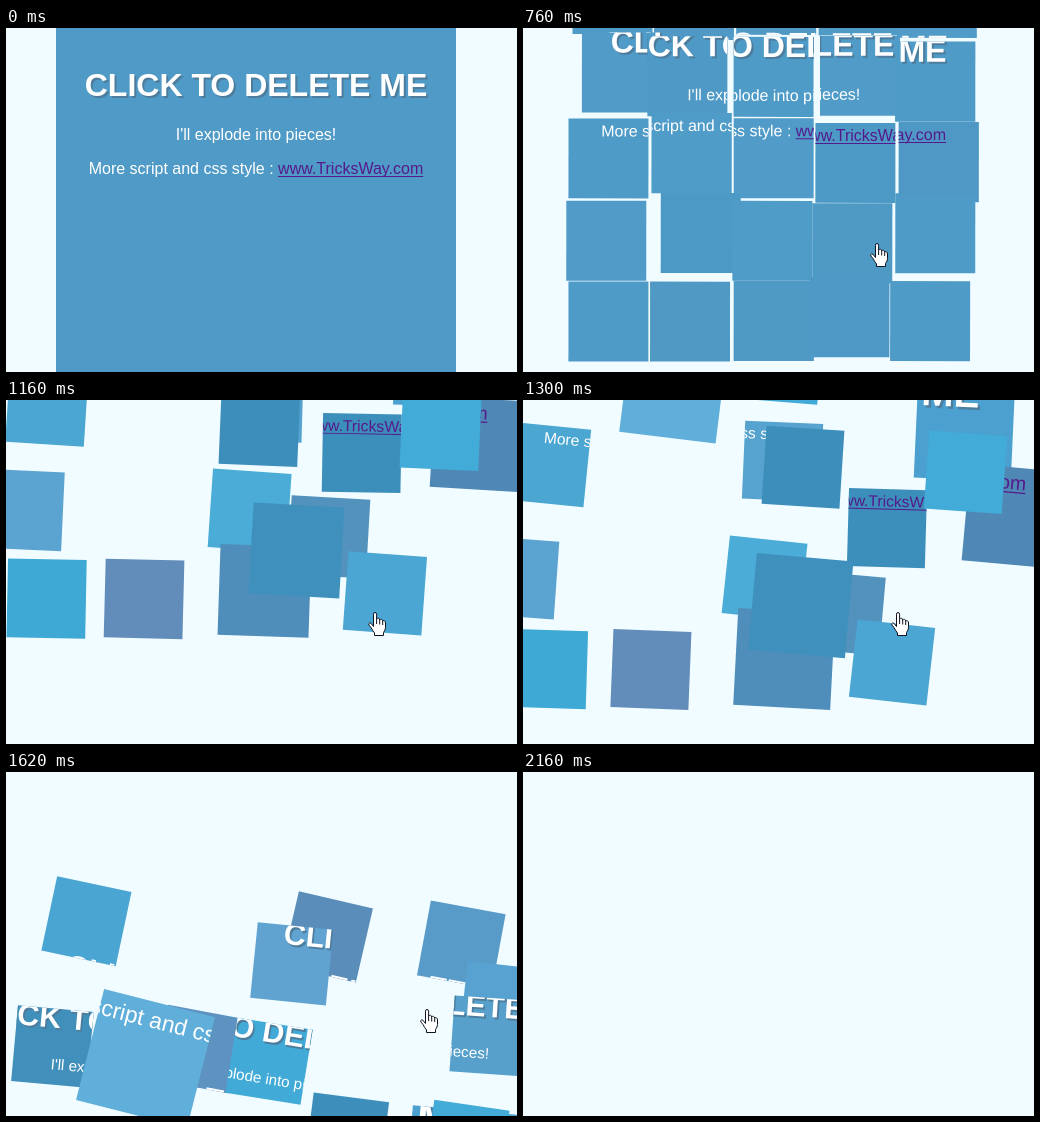
Animation, 511 px wide and 344 px high, one loop 2.88 s. Source, as an HTML page with a canvas:

```html
<!DOCTYPE html>
<html lang="en">
<head>
<meta charset="utf-8">
<title>Exploding box</title>
<style>
html, body { margin: 0; width: 100%; height: 100%; overflow: hidden; background: #f0fcff; }
canvas { display: block; }
</style>
</head>
<body>
<canvas id="stage" width="511" height="344"></canvas>
<script>
const ctx = document.getElementById('stage').getContext('2d');
const W = 511, H = 344, LOOP = 2880;
const BG = '#f0fcff', BASE = [79, 154, 198];
const BOX = { x: 50, y: -32, size: 400 }, TILE = 80;
const FONT = '"Liberation Sans", Arial, Helvetica, sans-serif';
const BOOM = 760, GONE = 1780;

// Row by row: colour, launch speed, sideways speed, turn in degrees, grows
const tiles = [
  ['#4ba5d3', 111.7, -1.1, 12], ['#5d92c1', 97, 2.6, 10.5], ['#5a8dba', 109.9, 8.2, 13],
  ['#589bc9', 109, 14.4, 10.5], ['#57a2d0', 102.3, 9.8, 6.5],
  ['#60a3d1', 116, 22.5, 5.7], ['#4190bc', 106.5, -14.2, 5.2], ['#41aad7', 104.8, 1.5, 9.2],
  ['#57a0cc', 107.7, 17.7, 4], ['#4ba0cf', 92.6, 5.6, 5.2, true],
  ['#4ba6d2', 100.9, -11.5, 11.5], ['#60aeda', 114.3, -3.5, 14.2, true], ['#57a3d0', 101.5, 1.7, 5],
  ['#3d8fbb', 89.6, 6.05, 3.2], ['#4f88b5', 91.7, 14.5, 10.5, true],
  ['#5ba3d0', 95, -17, 8.3], ['#3d8ebb', 114.7, 19.6, 7.3], ['#4bacd8', 94.9, -1.5, 12.3],
  ['#5292bd', 88.7, -1.7, 10.3], ['#42abd8', 113.8, 5.8, 8.3],
  ['#3fa9d6', 93, -11.6, 3.5], ['#628cb9', 92.9, -7.5, 4.5], ['#4f8dba', 94.8, 2, 6, true],
  ['#3f90bd', 104.3, -9.3, 10.2, true], ['#4ba6d3', 94.2, -7.3, 13]
].map(([color, v, vx, turn, grows], i) => ({
  rgb: [1, 3, 5].map(n => parseInt(color.substr(n, 2), 16)),
  v, vx, turn: turn * Math.PI / 180,
  grow: grows ? 0.43 : -0.05,
  x: BOX.x + TILE * (i % 5 + 0.5),
  y: BOX.y + TILE * (Math.floor(i / 5) + 0.5)
}));

// Pictures advance every 80 ms inside each burst: start, steps
const bursts = [[0, 1], [140, 4], [760, 7], [1300, 7], [1860, 4], [2160, 1]];
function snap(ms) {
  const [start, steps] = bursts.filter(b => b[0] <= ms).pop();
  return start + 80 * Math.min(steps - 1, Math.floor((ms - start) / 80));
}

// Pointer path: time, left, top
const path = [
  [140, 457, 329], [220, 418, 286], [300, 372, 240], [380, 346, 215], [760, 347, 215],
  [1000, 355, 212], [1300, 368, 212], [1460, 379, 213], [1620, 414, 237],
  [1780, 444, 289], [1940, 461, 317], [2100, 471, 338]
];
function pointerAt(ms) {
  const i = Math.max(1, path.findIndex(p => p[0] >= ms));
  const [t0, x0, y0] = path[i - 1], [t1, x1, y1] = path[i];
  const f = (ms - t0) / (t1 - t0);
  return [x0 + (x1 - x0) * f, y0 + (y1 - y0) * f].map(Math.round);
}

const hand = new Path2D('M5.5 14.5V2.2Q5.5 .5 7 .5T8.6 2.2V7.5Q9.3 6 10.5 6.3T11.7 8' +
  'Q12.4 7 13.5 7.4T14.7 9Q15.6 8.2 16.6 8.9T17.5 11V15.5Q17.5 18 15.5 20.5V23.5H6.5V21' +
  'Q4.5 18.5 3 15.5Q.5 12.8 .6 11.8Q1.2 10.3 3 11.3Z');
const knuckles = new Path2D('M8.6 7.5V12M11.7 8V12.5M14.7 9V13');
const arrow = new Path2D('M.5 .5V16.5L4.2 13L6.8 18.8L9 17.8L6.5 12.2H11.8Z');

function drawPointer(ms) {
  const [x, y] = pointerAt(ms);
  const overBox = ms > 140 && ms <= GONE;
  const shape = overBox ? hand : arrow;
  ctx.save();
  ctx.translate(x, y);
  ctx.fillStyle = '#fff';
  ctx.strokeStyle = '#10131f';
  ctx.fill(shape);
  ctx.stroke(shape);
  if (overBox) ctx.stroke(knuckles);
  ctx.restore();
}

function text(str, x, y, color) {
  ctx.fillStyle = color;
  ctx.fillText(str, x, y);
}

function drawText() {
  const mid = BOX.x + BOX.size / 2;
  ctx.textAlign = 'center';
  ctx.font = 'bold 32px ' + FONT;
  text('CLICK TO DELETE ME', mid + 2, 70, '#4d7c9c');
  text('CLICK TO DELETE ME', mid, 68, '#fff');
  ctx.font = '16px ' + FONT;
  text("I'll explode into pieces!", mid, 112, '#fff');

  const lead = 'More script and css style : ', link = 'www.TricksWay.com';
  const leadW = ctx.measureText(lead).width, linkW = ctx.measureText(link).width;
  const left = mid - (leadW + linkW) / 2;
  ctx.textAlign = 'left';
  text(lead, left, 146, '#fff');
  text(link, left + leadW, 146, '#551a8b');
  ctx.fillRect(left + leadW, 148, linkW, 1);
}

function drawTile(tile, t) {
  const p = Math.pow(t / 8.7, 1.6);
  const mix = Math.min(1, Math.pow(t / 2.6, 1.3));
  const rgb = tile.rgb.map((c, i) => Math.round(BASE[i] + (c - BASE[i]) * mix));
  const scale = 1 + tile.grow * p;
  ctx.save();
  ctx.translate(tile.x + tile.vx * t, tile.y - tile.v * t + 14.7 * t * t);
  ctx.rotate(tile.turn * p);
  ctx.scale(scale, scale);
  ctx.beginPath();
  ctx.rect(-TILE / 2, -TILE / 2, TILE, TILE);
  ctx.fillStyle = `rgb(${rgb})`;
  ctx.fill();
  ctx.clip();
  ctx.translate(-tile.x, -tile.y);
  drawText();
  ctx.restore();
}

function draw(ms) {
  ctx.fillStyle = BG;
  ctx.fillRect(0, 0, W, H);
  if (ms < BOOM) {
    ctx.fillStyle = `rgb(${BASE})`;
    ctx.fillRect(BOX.x, BOX.y, BOX.size, BOX.size);
    drawText();
  } else if (ms < GONE) {
    const t = 0.395 + (ms - BOOM) * 0.00966;
    tiles.forEach(tile => drawTile(tile, t));
  }
  if (ms >= 140 && ms < 2160) drawPointer(ms);
}

const begin = performance.now();
function tick() {
  draw(snap((performance.now() - begin) % LOOP));
  requestAnimationFrame(tick);
}
tick();
</script>
</body>
</html>
```
